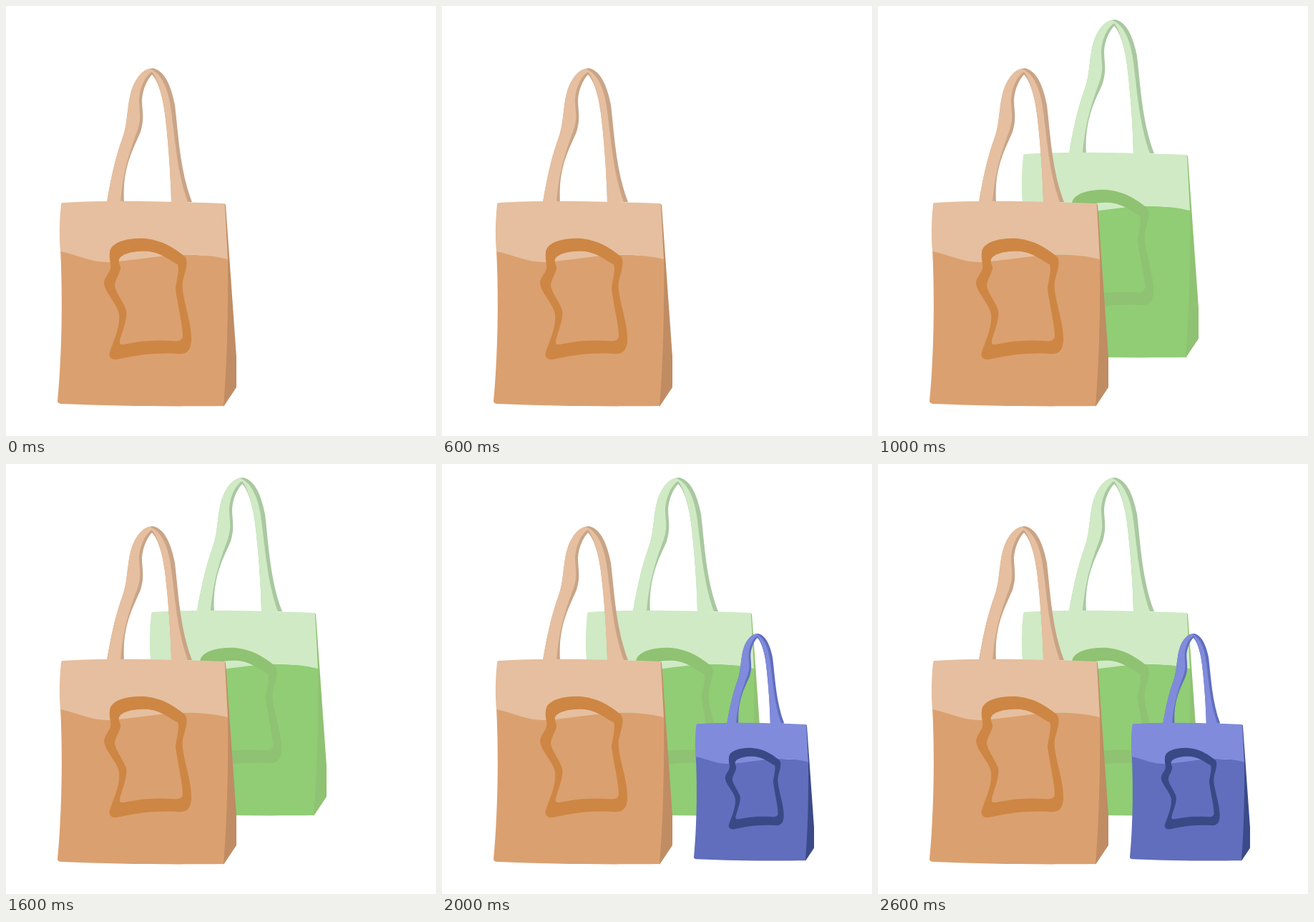
These frames come from a looping animation (601x601 px, 3000 ms). An HTML page:

```html
<!DOCTYPE html>
<html lang="en">
<head>
<meta charset="utf-8">
<title>Tote bags</title>
<style>
  html, body { margin: 0; height: 100%; overflow: hidden; background: #fff; }
  svg { display: block; width: 100vw; height: 100vh; }
  .orange { --light: #e5bf9f; --main: #dba06f; --ring: #ce8644; --side: #c08c63; --edge: #c9a486; }
  .green { --light: #d0eac5; --main: #90cd75; --ring: #8fc272; --side: #8fc272; --edge: #a9c8a0; }
  .blue { --light: #808bdb; --main: #606ebd; --ring: #394986; --side: #3b4a88; --edge: #606ebd; }
</style>
</head>
<body>
<svg viewBox="0 0 601 601">
  <defs>
    <g id="bag">
      <!-- strap: dark thickness, then lit face -->
      <path fill="var(--edge)" d="M141 274C146 245 152 214 163 184C172 160 168 127 181 105C189 91 198 87 206 87
        C222 91 231 112 236 138C241 180 243 230 260 274H231C230 235 227 190 222 150C219 124 211 102 204 96
        C197 103 191 117 190 131C190 146 194 157 188 176C180 196 162 224 165 274Z"/>
      <path fill="var(--light)" d="M141 274C146 245 152 214 163 184C172 160 168 127 181 105C188 93 195 88 201 88
        C216 93 226 113 230 140C236 180 238 230 254 274H231C230 235 227 190 222 150C219 124 211 100 204 92
        C194 98 187 115 186 131C186 146 190 155 184 173C177 193 164 224 160 274Z"/>
      <path fill="var(--side)" d="M305 276L307 278L322 490V533L304 560Z"/>
      <path fill="var(--main)" d="M76 340C80 420 77 500 72 552Q72 556 78 556C150 559 220 560 304 559
        C309 500 311 420 310 350Z"/>
      <path fill="var(--light)" d="M79 275C140 271 230 273 304 276Q306 276 306 279L310 354
        C250 339 190 355 146 358C120 359 100 348 76 343C74 322 75 295 77 278Q77 275 79 275Z"/>
      <path fill="var(--ring)" fill-rule="evenodd" d="M145 345C146 328 175 324 195 325
        C222 328 238 341 250 350C256 358 250 372 247 385C244 405 260 440 259 468
        C258 484 250 487 240 486C200 484 175 490 155 494C147 495 143 490 145 484
        C150 468 160 450 158 430C155 415 137 400 137 386C140 374 148 372 146 360Q144 351 145 345Z
        M158 354C163 344 185 342 200 343C220 346 230 357 240 361C243 368 238 385 237 395
        C240 420 247 445 247 462C246 468 240 469 232 468C200 466 180 470 165 473
        C158 474 158 470 160 464C165 448 170 435 168 425C162 410 153 400 152 390
        C154 378 161 372 160 364Q157 358 158 354Z"/>
    </g>
  </defs>
  <use href="#bag" class="green" data-start="1000" transform="translate(126 -68)"/>
  <use href="#bag" class="orange" data-start="0"/>
  <use href="#bag" class="blue" data-start="2000" transform="translate(303.6 178.5) scale(.672)"/>
</svg>
<script>
  const LOOP = 3000;
  const bags = document.querySelectorAll('use');
  const start = performance.now();

  function draw() {
    const time = (performance.now() - start) % LOOP;
    for (const bag of bags) {
      bag.style.visibility = time >= bag.dataset.start ? 'visible' : 'hidden';
    }
    requestAnimationFrame(draw);
  }
  draw();
</script>
</body>
</html>
```
